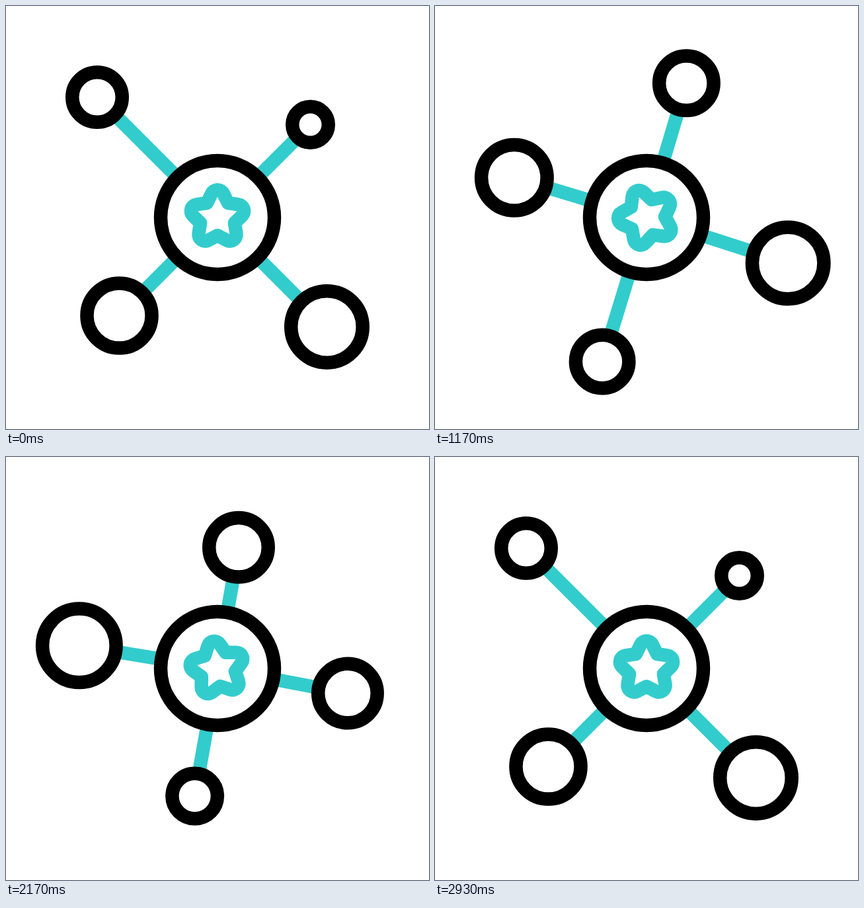
An HTML page for the animation above (3000 ms loop, 640x640 px).

```html
<!DOCTYPE html>
<html lang="en">
<head>
<meta charset="utf-8">
<title>Network star</title>
<style>
  html, body { margin: 0; width: 100%; height: 100%; overflow: hidden; background: #fff; }
  svg { display: block; width: 100%; height: 100%; }
</style>
</head>
<body>
<svg viewBox="-320 -320 640 640">
  <g id="links" stroke="#33cccc" stroke-width="20.5"></g>
  <g id="nodes" fill="#fff" stroke="#000" stroke-width="20.5"></g>
  <path id="star" fill="none" stroke="#33cccc" stroke-linejoin="round"/>
</svg>
<script>
const LOOP = 3000, FPS = 30, STROKE = 20.5;
const START = 5, STEP = 20;

// Each list holds the resting, middle and far pose of a node.
const nodes = [
  { base: -135, turn: [0, -0.1, -0.8], dist: [257.4, 186, 238], outer: [48, 55, 48] },
  { base: -45, turn: [0, 0.8, 0.9], dist: [198.7, 200.5, 249.5], outer: [37.5, 55, 74] },
  { base: 45, turn: [0, 0.1, 0], dist: [234, 196, 260], outer: [64.5, 44.5, 56.5] },
  { base: 135, turn: [0, -0.6, 0.1], dist: [210, 212, 206], outer: [59.3, 66, 54] }
];
const POSE_ORDER = [0, 1, 2, 1, 0];

const swing = spline([[5, 0], [23, 30.85], [35, 62], [45, 79], [53, 79], [65, 55], [77, 18], [85, 0]]);
const starTurn = spline([[5, 0], [23, 64], [35, 124], [53, 216], [65, 279], [77, 343], [85, 360]]);
const starScale = spline([[5, 1], [23, 1.25], [35, 1.03], [53, 0.9], [65, 1], [77, 1.22], [85, 1]]);

const rad = deg => deg * Math.PI / 180;
const polar = (r, deg) => [r * Math.cos(rad(deg)), r * Math.sin(rad(deg))];
const clamp = (v, lo, hi) => Math.min(hi, Math.max(lo, v));

// Smooth curve through the points, at rest at both ends.
function spline(points) {
  const last = points.length - 1;
  const slope = i => (points[i + 1][1] - points[i][1]) / (points[i + 1][0] - points[i][0]);
  const tangents = points.map((p, i) => {
    if (i === 0 || i === last) return 0;
    const before = p[0] - points[i - 1][0], after = points[i + 1][0] - p[0];
    return (after * slope(i - 1) + before * slope(i)) / (before + after);
  });
  return x => {
    x = clamp(x, points[0][0], points[last][0]);
    let i = 0;
    while (i < last - 1 && x > points[i + 1][0]) i++;
    const [x0, y0] = points[i], [x1, y1] = points[i + 1];
    const h = x1 - x0, s = (x - x0) / h, u = 1 - s;
    return y0 * (1 + 2 * s) * u * u + y1 * s * s * (3 - 2 * s)
      + h * s * u * (tangents[i] * u - tangents[i + 1] * s);
  };
}

// cubic-bezier(1/6, 0, 5/6, 1)
function ease(x) {
  let lo = 0, hi = 1;
  for (let i = 0; i < 24; i++) {
    const s = (lo + hi) / 2, u = 1 - s;
    if (0.5 * u * u * s + 2.5 * u * s * s + s * s * s < x) lo = s; else hi = s;
  }
  return lo * lo * (3 - 2 * lo);
}

function starPath() {
  const tipRadius = 54, notchRadius = 27.2, corner = 9.9, cut = 19.8;
  const toward = (from, to) => {
    const k = cut / Math.hypot(to[0] - from[0], to[1] - from[1]);
    return from.map((v, i) => v + (to[i] - v) * k);
  };
  let d = "";
  for (let i = 0; i < 5; i++) {
    const angle = -90 + 72 * i;
    const tip = polar(tipRadius, angle);
    const before = polar(notchRadius, angle - 36), after = polar(notchRadius, angle + 36);
    d += `${i ? "L" : "M"}${before}L${toward(tip, before)}A${corner} ${corner} 0 0 1 ${toward(tip, after)}`;
  }
  return d + "Z";
}

function add(parentId, tag, attrs = {}) {
  const el = document.createElementNS("http://www.w3.org/2000/svg", tag);
  document.getElementById(parentId).appendChild(el);
  return set(el, attrs);
}

function set(el, attrs) {
  for (const name in attrs) el.setAttribute(name, attrs[name]);
  return el;
}

for (const node of nodes) {
  node.link = add("links", "line");
  node.ring = add("nodes", "circle");
}
add("nodes", "circle", { r: 86 });
const star = set(document.getElementById("star"), { d: starPath() });

function render(ms) {
  const frame = Math.floor((ms % LOOP + 3.5) * FPS / 1000);
  const progress = clamp((frame - START) / STEP, 0, 4);
  const leg = Math.min(3, Math.floor(progress));
  const mix = ease(progress - leg);
  const pose = list => {
    const from = list[POSE_ORDER[leg]], to = list[POSE_ORDER[leg + 1]];
    return from + (to - from) * mix;
  };

  for (const node of nodes) {
    const [x, y] = polar(pose(node.dist), node.base + swing(frame) + pose(node.turn));
    set(node.link, { x2: x, y2: y });
    set(node.ring, { cx: x, cy: y, r: pose(node.outer) - STROKE / 2 });
  }

  const scale = starScale(frame);
  set(star, {
    transform: `rotate(${starTurn(frame)}) scale(${scale})`,
    "stroke-width": STROKE / scale
  });
}

const begin = performance.now();
function tick() {
  render(performance.now() - begin);
  requestAnimationFrame(tick);
}
tick();
</script>
</body>
</html>
```
